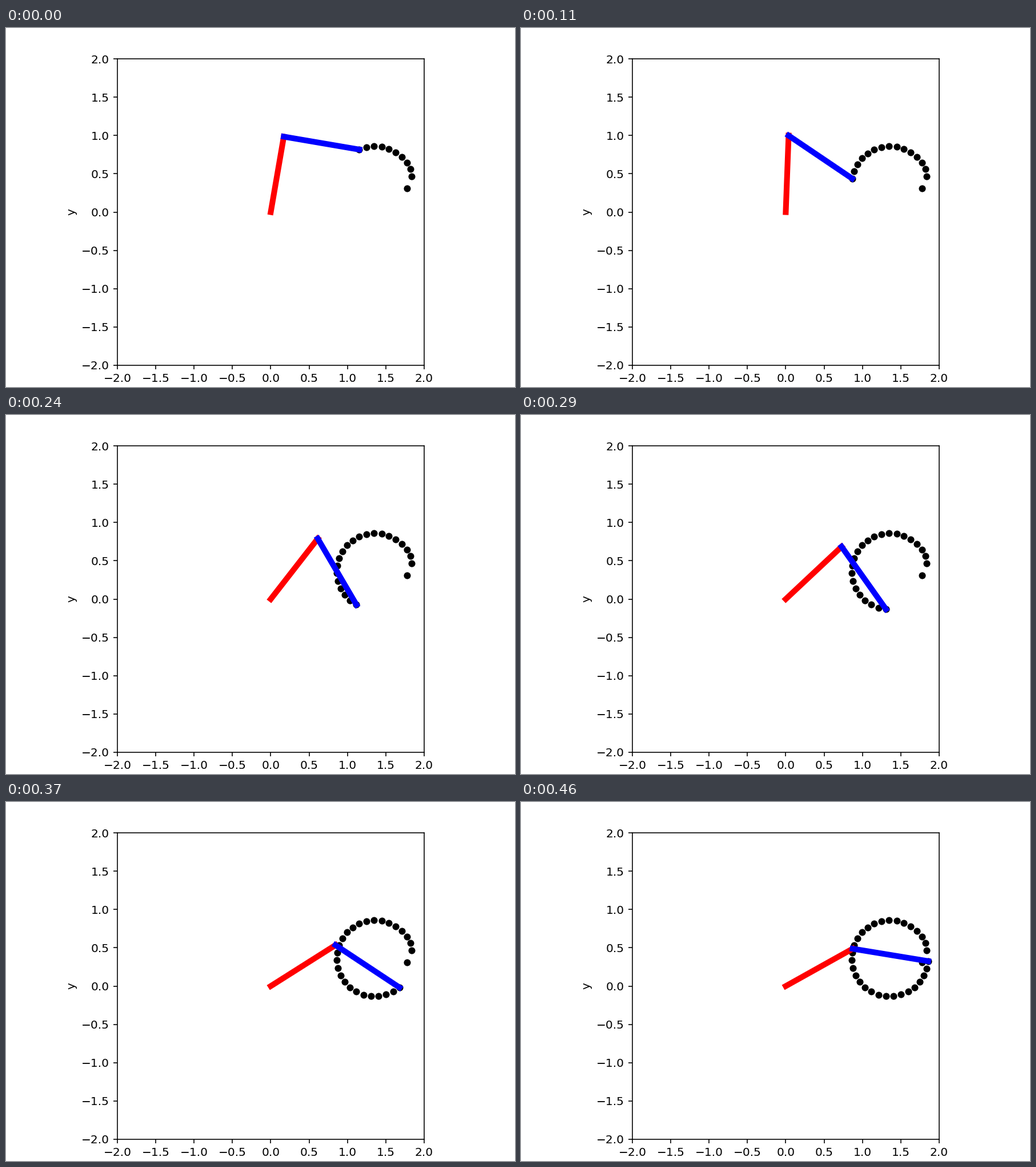
A matplotlib script that plays this animation: 891x629 px, repeating every 0.56 s.

```python
import numpy as np
import matplotlib.pyplot as plt
from matplotlib.animation import FuncAnimation

W, H, DPI = 891, 629, 145
TICK_MS = 10
LOOP_MS = 560
FIRST_DOTS = 11      # dots already drawn when the loop starts
LAST_STEP = 21

plt.rcParams["font.family"] = "DejaVu Sans"


def joints(angles):
    """Elbow and tip of the two unit links, from their absolute angles."""
    elbow = np.array([np.cos(angles[0]), np.sin(angles[0])])
    return elbow, elbow + [np.cos(angles[1]), np.sin(angles[1])]


def solve_path():
    """Follow a circle with one Newton step of inverse kinematics per point."""
    angles = np.radians([60.0, -30.0])
    centre = joints(angles)[1]
    elbows, tips = [], []
    for t in np.arange(0, 2 * np.pi, 0.2):
        target = centre + 0.5 * np.array([np.cos(t), np.sin(t)])
        jacobian = np.array([-np.sin(angles), np.cos(angles)])
        angles = angles + np.linalg.solve(jacobian, target - joints(angles)[1])
        elbow, tip = joints(angles)
        elbows.append(elbow)
        tips.append(tip)
    return np.array(elbows), np.array(tips)


elbows, tips = solve_path()

# Start of each step, on a 10 ms clock
starts = np.floor(2.19 * np.arange(LAST_STEP + 1) + 0.75)

fig = plt.figure(figsize=((W + 0.01) / DPI, (H + 0.01) / DPI), dpi=DPI,
                 facecolor="white")
ax = fig.add_axes([195.2 / W, 38.2 / H, 536.5 / W, 536.5 / H])
ax.set(xlim=(-2, 2), ylim=(-2, 2), ylabel="y")
ax.set_xticks(np.arange(-2, 2.1, 0.5))
ax.set_yticks(np.arange(-2, 2.1, 0.5))

trail, = ax.plot([], [], "o", color="black", ms=6, mew=0, zorder=1)
upper, = ax.plot([], [], color="red", lw=5)
lower, = ax.plot([], [], color="blue", lw=5)


def draw(frame):
    step = np.searchsorted(starts, frame, side="right") - 1
    count = step + FIRST_DOTS
    elbow, tip = elbows[count - 1], tips[count - 1]
    trail.set_data(tips[:count, 0], tips[:count, 1])
    upper.set_data([0, elbow[0]], [0, elbow[1]])
    lower.set_data([elbow[0], tip[0]], [elbow[1], tip[1]])
    return trail, upper, lower


anim = FuncAnimation(fig, draw, frames=LOOP_MS // TICK_MS, interval=TICK_MS,
                     repeat=True, repeat_delay=0, blit=False)
plt.show()
```
